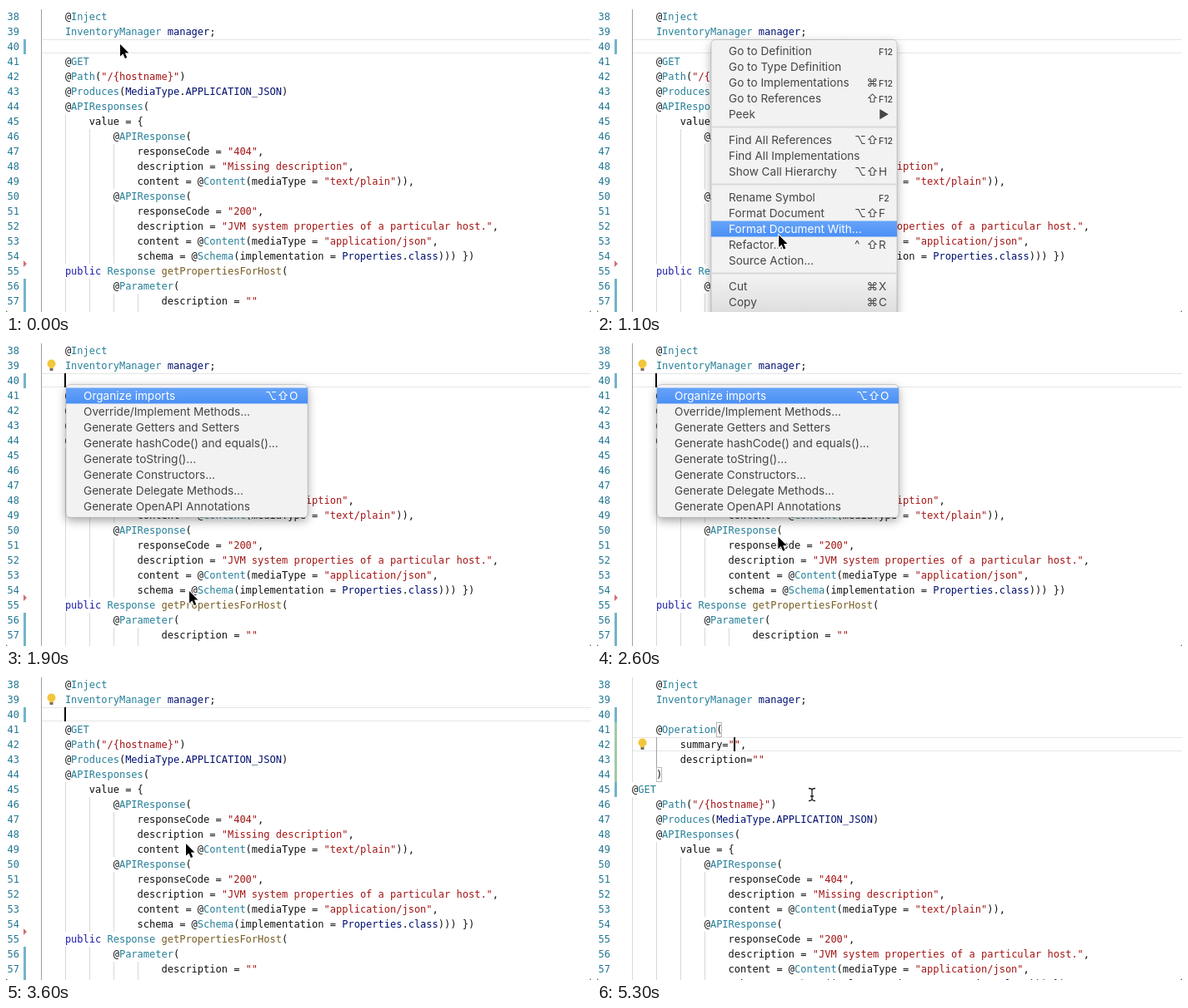
Write an HTML page with a canvas that moves like this. It is 702 px wide and 368 px high and loops after 5400 ms.

```html
<!DOCTYPE html>
<html lang="en">
<head>
<meta charset="utf-8">
<title>Code editor</title>
<style>
html, body { margin: 0; width: 100%; height: 100%; overflow: hidden; background: #777; }
canvas { display: block; background: #fff; border-radius: 0 0 4px 4px; }
</style>
</head>
<body>
<canvas id="stage" width="702" height="368"></canvas>
<script>
const ctx = document.getElementById('stage').getContext('2d');
const LOOP = 5400, STEP = 100, LEFT = 42, CHAR = 7.224, ROW = 18, FIRST = 38;
const MONO = '12px "DejaVu Sans Mono", monospace';
const UI = 'Inter, "DejaVu Sans", sans-serif';
const colX = col => LEFT + col * CHAR;
const rowY = row => 4 + row * ROW;

const before = `    @Inject
    InventoryManager manager;

    @GET
    @Path("/{hostname}")
    @Produces(MediaType.APPLICATION_JSON)
    @APIResponses(
        value = {
            @APIResponse(
                responseCode = "404",
                description = "Missing description",
                content = @Content(mediaType = "text/plain")),
            @APIResponse(
                responseCode = "200",
                description = "JVM system properties of a particular host.",
                content = @Content(mediaType = "application/json",
                schema = @Schema(implementation = Properties.class))) })
    public Response getPropertiesForHost(
            @Parameter(
                    description = ""
`.split('\n');
const added = `    @Operation(
        summary="",
        description=""
    )
@GET`.split('\n');
const after = [...before.slice(0, 3), ...added, ...before.slice(4)].slice(0, 21);

const contextMenu = [
  ['Go to Definition', ' F12'], ['Go to Type Definition'], ['Go to Implementations', '⌘ F12'],
  ['Go to References', '⇧ F12'], ['Peek', ' ▶'], null,
  ['Find All References', '⌥⇧ F12'], ['Find All Implementations'], ['Show Call Hierarchy', '⌥⇧ H'], null,
  ['Rename Symbol', ' F2'], ['Format Document', '⌥⇧ F'], ['Format Document With...'],
  ['Refactor...', '^⇧ R'], ['Source Action...'], null,
  ['Cut', '⌘ X'], ['Copy', '⌘ C']
];
const sourceMenu = [
  ['Organize imports', '⌥⇧ O'], ['Override/Implement Methods...'], ['Generate Getters and Setters'],
  ['Generate hashCode() and equals()...'], ['Generate toString()...'], ['Generate Constructors...'],
  ['Generate Delegate Methods...'], ['Generate OpenAPI Annotations']
];

// time, x, y of the pointer
const path = [
  [0, 137, 46], [400, 137, 46], [700, 211, 170], [1200, 220, 302], [2000, 220, 302],
  [2900, 216, 204], [3600, 216, 204], [4200, 191, 100], [4500, 165, 86], [4800, 165, 86],
  [5000, 258, 145], [LOOP, 258, 145]
];

const clamp = v => Math.max(0, Math.min(1, v));
const within = (t, a, b) => t >= a && t < b;

function pointerAt(t) {
  const i = path.findIndex(p => p[0] > t);
  const [t0, x0, y0] = path[i - 1], [t1, x1, y1] = path[i];
  const k = (t - t0) / (t1 - t0);
  return [x0 + (x1 - x0) * k, y0 + (y1 - y0) * k];
}

function box(x, y, w, h, color) {
  ctx.fillStyle = color;
  ctx.fillRect(x, y, w, h);
}

function text(s, x, y, color, font) {
  ctx.fillStyle = color;
  ctx.font = font;
  ctx.fillText(s, x, y);
}

function tokenColor(word, prev) {
  if (word[0] === '"') return '#a31515';
  if (prev === '@' || /^(InventoryManager|Response)$/.test(word)) return '#267f99';
  if (/^(manager|MediaType|APPLICATION_JSON|Properties|class)$/.test(word)) return '#001070';
  if (word === 'public') return '#1c1ca8';
  if (word === 'getPropertiesForHost') return '#795e26';
  return '#111';
}

function drawCode(lines, active) {
  let indent = 0;
  lines.forEach((line, row) => {
    const y = rowY(row);
    if (line) indent = line.search(/\S/);
    for (let col = 0; col < indent; col += 4) {
      const on = col === active.col && row >= active.from && row <= active.to;
      box(Math.round(colX(col)), y, 1, ROW, on ? '#a0a0a0' : '#d8d8d8');
    }
    text(FIRST + row, 1.5, y + 13, '#237893', MONO);
    for (const m of line.matchAll(/"[^"]*"|\w+|[^\s\w]/g))
      text(m[0], colX(m.index), y + 13, tokenColor(m[0], line[m.index - 1]), MONO);
  });
}

function drawGutter(edited) {
  const bar = (row, n, color) => box(21, rowY(row), 3, n * ROW, color);
  const changed = '#72b5c9';
  bar(2, 1, changed);
  if (edited) {
    bar(3, 4, '#9fcba6');
    bar(7, 1, changed);
  } else {
    bar(18, 3, changed);
    ctx.fillStyle = '#cf6f78';
    ctx.beginPath();
    ctx.moveTo(21, 306); ctx.lineTo(25, 310); ctx.lineTo(21, 314);
    ctx.fill();
  }
}

function drawBulb(y) {
  ctx.fillStyle = '#f3c53c';
  ctx.beginPath();
  ctx.arc(54.5, y - 1.5, 5, 0, 7);
  ctx.fill();
  box(52, y + 2, 5, 2, '#f3c53c');
  box(52.5, y + 4, 4, 3, '#77705c');
}

function drawMenu(x, y, w, h, items, hoverY, alpha) {
  ctx.save();
  ctx.globalAlpha = alpha;
  const shade = ctx.createLinearGradient(0, 325, 0, 368);
  shade.addColorStop(0, '#f2f2f2');
  shade.addColorStop(1, '#dedede');
  ctx.fillStyle = shade;
  ctx.shadowColor = 'rgba(0,0,0,.35)';
  ctx.shadowBlur = 12;
  ctx.shadowOffsetY = 4;
  ctx.beginPath();
  ctx.roundRect(x, y, w, h, 5);
  ctx.fill();
  ctx.shadowColor = 'transparent';
  ctx.strokeStyle = 'rgba(0,0,0,.16)';
  ctx.lineWidth = 1;
  ctx.stroke();
  let mid = y + 13.5;
  for (const item of items) {
    if (!item) {
      box(x, mid - 4.5, w, 2, '#dadada');
      mid += 12;
      continue;
    }
    const hot = Math.abs(hoverY - mid) < 9.5;
    const color = hot ? '#fff' : '#454545';
    if (hot) {
      const blue = ctx.createLinearGradient(0, mid - 9, 0, mid + 9);
      blue.addColorStop(0, '#66a3f8');
      blue.addColorStop(1, '#4b90f6');
      box(x, mid - 9.5, w, 19, blue);
    }
    text(item[0], x + 21, mid + 5, color, '13.6px ' + UI);
    if (item[1]) {
      const [mods, key] = item[1].split(' ');
      const keyX = x + w - 22;
      text(key, keyX, mid + (key[1] ? 4.5 : 5), color, (key[1] ? '500 10.5px ' : '13.6px ') + UI);
      [...mods].forEach((m, i) => text(m, keyX - 14.5 * (mods.length - i), mid + 5, color, '13.6px ' + UI));
    }
    mid += 19;
  }
  ctx.restore();
}

function drawArrow(x, y) {
  ctx.beginPath();
  [[0, 0], [0, 14.5], [3.4, 11.4], [5.8, 17], [8.2, 16], [5.9, 10.5], [10.4, 10.4]]
    .forEach(([dx, dy]) => ctx.lineTo(x + dx, y + dy));
  ctx.closePath();
  ctx.strokeStyle = '#fff';
  ctx.lineWidth = 2;
  ctx.stroke();
  ctx.fillStyle = '#000';
  ctx.fill();
}

function drawIBeam(x, y) {
  const beam = new Path2D(`M${x - 4} ${y - 7.5}q4 0 4 2.5v10q0 2.5 -4 2.5M${x + 4} ${y - 7.5}q-4 0 -4 2.5v10q0 2.5 4 2.5M${x - 2} ${y + 2}h4`);
  for (const [color, width] of [['#fff', 3], ['#222', 1.3]]) {
    ctx.strokeStyle = color;
    ctx.lineWidth = width;
    ctx.stroke(beam);
  }
}

function draw(t) {
  const edited = t >= 3800, moved = t >= 4700;
  const [px, py] = pointerAt(t);
  const line = moved ? 4 : 2;

  box(0, 0, 702, 368, '#fff');
  box(LEFT, rowY(line), 660, 1, '#e6e6e6');
  box(LEFT, rowY(line) + ROW - 2, 660, 1, '#e6e6e6');
  if (moved) {
    ctx.strokeStyle = '#b9b9b9';
    ctx.lineWidth = 1;
    ctx.strokeRect(143.5, 58.5, 6, 17);
    ctx.strokeRect(71.5, 112.5, 6, 17);
  }
  drawCode(edited ? after : before,
    moved ? { col: 4, from: 4, to: 5 } : { col: 0, from: 0, to: edited ? 6 : 20 });
  drawGutter(edited);

  if (moved) box(164, rowY(4), 2, 17, '#000');
  else if (t >= 1800) box(70, rowY(2), 2, 17, '#000');
  if (within(t, 1800, 3800)) drawBulb(30);
  if (t >= 4900) drawBulb(84);

  if (within(t, 300, 1800))
    drawMenu(137, 40.5, 223, 360, contextMenu, t < 800 ? -1 : py, clamp((1780 - t) / 230));
  if (within(t, 1900, 3600))
    drawMenu(72, 53.5, 290, 160, sourceMenu, py > 209 ? 67 : py, clamp((3600 - t) / 200));

  if (within(t, 200, 400) || within(t, 1300, 1500) || within(t, 3100, 3300) || within(t, 4600, 4800)) {
    ctx.strokeStyle = '#222';
    ctx.lineWidth = 1.4;
    ctx.beginPath();
    ctx.arc(px, py + 1, 21.5, 0, 7);
    ctx.stroke();
  }
  (t >= 4800 ? drawIBeam : drawArrow)(px, py);
}

function tick() {
  draw(Math.floor(performance.now() % LOOP / STEP) * STEP);
  requestAnimationFrame(tick);
}
tick();
</script>
</body>
</html>
```
